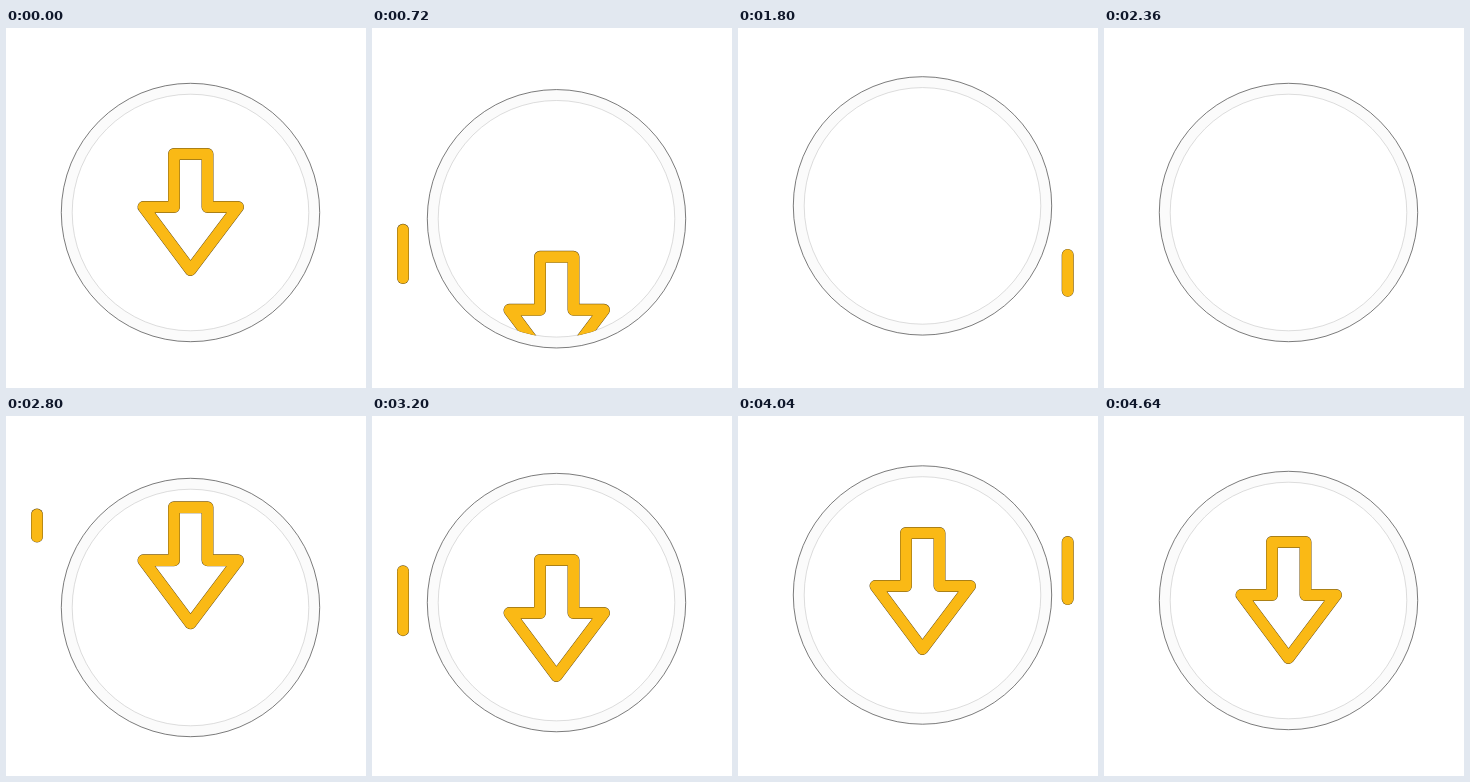
An HTML page for the animation above (4920 ms loop, 360 px wide and 360 px high).

```html
<!DOCTYPE html>
<html lang="en">
<head>
<meta charset="utf-8">
<style>
  html, body { margin: 0; height: 100%; overflow: hidden; background: #fff; }
  svg { display: block; width: 100vw; height: 100vh; }
  .line { fill: none; stroke-linecap: round; stroke-linejoin: round; }
  .edge { stroke: #5c4718; stroke-width: 12; }
  .gold { stroke: #fab915; stroke-width: 11.2; }
</style>
</head>
<body>
<svg viewBox="0 0 360 360">
  <defs>
    <clipPath id="inside"><circle id="hole" cx="184.5" cy="184.5" r="118.5"/></clipPath>
    <path id="shape" d="M168 126H201.5V179H232L184.5 242 137.5 179H168Z"/>
  </defs>
  <g id="ring" fill="none">
    <circle cx="184.5" cy="184.5" r="123.7" stroke="#fbfbfb" stroke-width="11"/>
    <circle cx="184.5" cy="184.5" r="129.2" stroke="#444" stroke-width=".7"/>
    <circle cx="184.5" cy="184.5" r="118.3" stroke="#bbb" stroke-width=".5"/>
  </g>
  <g clip-path="url(#inside)">
    <g id="arrow" class="line">
      <use href="#shape" class="edge"/>
      <use href="#shape" class="gold"/>
    </g>
  </g>
  <g id="left" class="line"><path class="edge"/><path class="gold"/></g>
  <g id="right" class="line"><path class="edge"/><path class="gold"/></g>
</svg>
<script>
  const LOOP = 4920;
  const $ = id => document.getElementById(id);
  const clamp = u => Math.min(1, Math.max(0, u));
  const ease = u => (u = clamp(u), u * u * (3 - 2 * u));

  // Keys are [step, value] pairs, eased in and out between neighbours.
  const bob = [[0, 0], [20, 7], [40, -7], [60, 7], [80, -7], [100, 0]];
  const drop = [[0, 0], [30, 187], [31, 400], [49, 400], [50, -195], [65, 21.4], [80, -11.5], [100, 0]];

  function track(keys, n) {
    const i = Math.max(1, keys.findIndex(k => k[0] >= n));
    const [a, from] = keys[i - 1], [b, to] = keys[i];
    return from + (to - from) * ease((n - a) / (b - a));
  }

  // The clock ticks unevenly: three steps every 140 ms, lasting 100, 20 and 20 ms.
  function stepAt(ms) {
    if (ms < 20) return 0;
    const t = ms - 20, rest = t % 140;
    return Math.min(100, 1 + 3 * Math.floor(t / 140) + (rest >= 100) + (rest >= 120));
  }

  function streak(id, x, starts, n) {
    const age = n - starts.filter(s => s <= n).pop();
    const visible = age > 0 && age < 24;
    $(id).style.display = visible ? '' : 'none';
    if (!visible) return;
    const y = u => 98.6 + 169 * ease(u);
    const d = `M${x} ${y((age - 5.2) / 18.8)}V${y(age / 20)}`;
    for (const path of $(id).children) path.setAttribute('d', d);
  }

  function draw(now) {
    const n = stepAt(now % LOOP);
    const shift = `translate(0 ${track(bob, n)})`;
    $('ring').setAttribute('transform', shift);
    $('hole').setAttribute('transform', shift);
    $('arrow').setAttribute('transform', `translate(0 ${track(drop, n)})`);
    streak('left', 31, [0, 55.5], n);
    streak('right', 329.7, [20, 76], n);
  }

  const begin = performance.now();
  (function tick() {
    draw(performance.now() - begin);
    requestAnimationFrame(tick);
  })();
</script>
</body>
</html>
```
